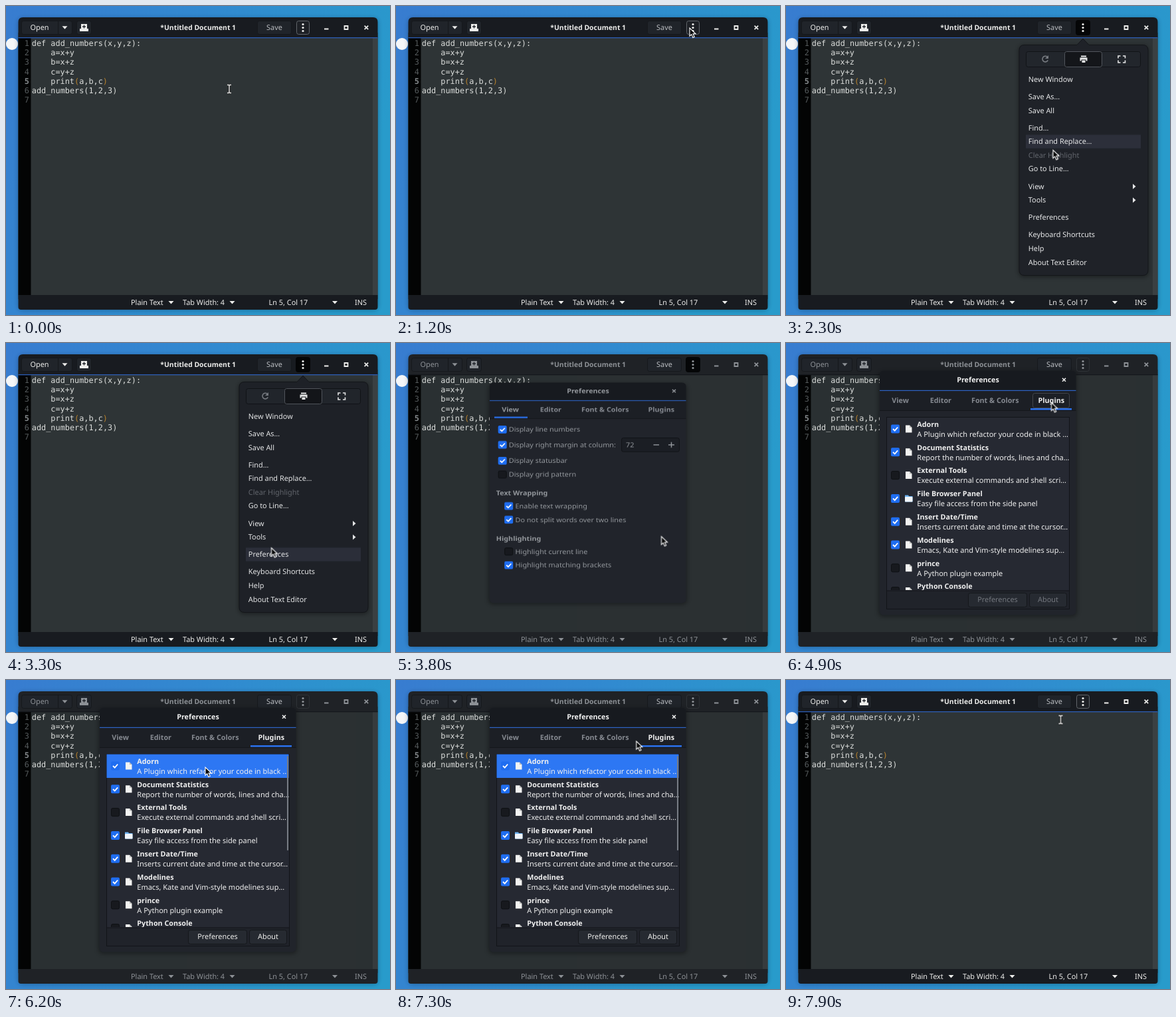
These frames come from a looping animation (578x464 px, 8 s). An HTML page:

```html
<!DOCTYPE html>
<html lang="en">
<head>
<meta charset="utf-8">
<title>Text editor preferences</title>
<style>
html, body { margin: 0; width: 100%; height: 100%; overflow: hidden; background: #2f86d0; }
svg { display: block; width: 578px; height: 464px; }
text { font: 10.9px "Noto Sans", "Open Sans", sans-serif; fill: currentColor; text-rendering: geometricPrecision; white-space: pre; }
.b { font-weight: 700; font-size: 10.75px; }
.title { font-weight: 700; font-size: 10.4px; }
.note { font-size: 11px; }
.mid { text-anchor: middle; }
.code { font: 11.86px "DejaVu Sans Mono", "Noto Sans Mono", monospace; fill: #dcdedc; }
.num { fill: #555a5c; text-anchor: end; }
.now { fill: #858a8c; font-weight: 700; }
.soft { fill: #b9bcc0; }
.off { fill: #62666d; }
.tab { fill: #858990; }
.bracket { fill: #b9812c; }

.chrome, .bar, .accent, .ring, .pressed, .menu, .hover, .view, .plugins, .tabhover,
.picked, .acts, .pointer, .arrow, .beam, .shade { animation: 8s infinite step-end; }

.chrome { animation-name: chrome; }
@keyframes chrome { 0%, 96.2% { color: #eeeeec } 45.4% { color: #8d9196 } }
.bar { animation-name: bar; }
@keyframes bar { 0%, 96.2% { fill: #181b20 } 45.4% { fill: #1f2226 } }
.accent { animation-name: accent; }
@keyframes accent { 0%, 96.2% { fill: #2c5cb4 } 45.4% { fill: #15181d } }
.ring { animation-name: ring; }
@keyframes ring { 0%, 96.2% { opacity: 1 } 45.4% { opacity: .25 } }
.shade { animation-name: shade; }
@keyframes shade { 0%, 96.2% { opacity: 0 } 45.4% { opacity: .07 } }
.pressed { animation-name: pressed; }
@keyframes pressed { 0%, 48.5% { opacity: 0 } 17.5% { opacity: 1 } }

.menu { color: #e6e7e8; animation-name: menu; animation-timing-function: linear; }
@keyframes menu { 0%, 17.5%, 42.5%, 100% { opacity: 0 } 18.75%, 41.25% { opacity: 1 } }
.hover { animation-name: hover; }
@keyframes hover {
  0% { transform: translateY(110px); opacity: 0 }
  25.16% { transform: translateY(110px); opacity: 1 }
  25.96% { transform: translateY(136px); opacity: 1 }
  26.6% { transform: translateY(157px); opacity: 1 }
  27.4% { transform: translateY(183px); opacity: 1 }
  28.04% { transform: translateY(203.5px); opacity: 1 }
  29.4% { transform: translateY(244.5px); opacity: 1 }
  30.4% { transform: translateY(271px); opacity: 1 }
  31.2% { transform: translateY(291.5px); opacity: 1 }
  32.2%, 100% { transform: translateY(317.5px); opacity: 1 }
}

.dialog { transform-origin: 0 225px; animation: dialog 8s infinite linear, focus 8s infinite step-end; }
@keyframes dialog {
  0%, 45.37%, 97%, 100% { transform: scaleY(0) }
  46.25% { transform: scaleY(.52) }
  47.5% { transform: scaleY(.9) }
  48.5%, 95.4% { transform: scaleY(1) }
}
@keyframes focus { 0%, 95.4% { color: #94989d } 48.4% { color: #f0f0f0 } }
.view { animation-name: view; }
@keyframes view { 0% { opacity: 1 } 59.4% { opacity: 0 } }
.plugins { animation-name: plugins; }
@keyframes plugins { 0% { opacity: 0 } 59.4% { opacity: 1 } }
.tabhover { animation-name: tabhover; }
@keyframes tabhover { 0%, 63.2% { opacity: 0 } 56.7% { opacity: 1 } }
.picked { animation-name: picked; }
@keyframes picked { 0% { opacity: 0 } 73.75% { opacity: 1 } }
.acts { animation-name: acts; }
@keyframes acts { 0% { color: #73777e } 73.75% { color: #eeeeec } }

.pointer { animation-name: pointer; animation-timing-function: linear; }
@keyframes pointer {
  0%, 7.5% { transform: translate(336px, 124.5px) }
  11.25% { transform: translate(450px, 128px) }
  12.5% { transform: translate(443px, 36px) }
  15% { transform: translate(442px, 33px) }
  23.125% { transform: translate(441px, 34px) }
  28.75% { transform: translate(402px, 216px) }
  32.5%, 39.4% { transform: translate(399.5px, 316px) }
  45%, 49.4% { transform: translate(399.5px, 290.5px) }
  56.9%, 62.5% { transform: translate(399.5px, 89.5px) }
  71.25%, 80% { transform: translate(300px, 131px) }
  88.75%, 91.25% { transform: translate(361.5px, 92px) }
  94%, 95.6% { transform: translate(416px, 54px) }
  98.1%, 100% { transform: translate(413.5px, 59.5px) }
}
.arrow { animation-name: arrow; }
@keyframes arrow { 0%, 96.3% { opacity: 0 } 11.6% { opacity: 1 } }
.beam { animation-name: beam; }
@keyframes beam { 0%, 96.3% { opacity: 1 } 11.6% { opacity: 0 } }
</style>
</head>
<body>
<svg id="stage" viewBox="0 0 578 464" xmlns="http://www.w3.org/2000/svg"></svg>
<script>
// Labels are placed by the vertical centre of their capitals.
const label = (x, y, s, cls = '') => `<text x="${x}" y="${y + 3.8}" class="${cls}">${s}</text>`;
const box = (x, y, w, h, fill, more = '') => `<rect x="${x}" y="${y}" width="${w}" height="${h}" fill="${fill}" ${more}/>`;
const button = (x, y, w, h, fill = '#20242a', line = '#15181c') =>
  box(x + .5, y + .5, w - 1, h - 1, fill, `rx="3" stroke="${line}"`);
const line = (d, w = 1.5) => `<path d="${d}" fill="none" stroke="currentColor" stroke-width="${w}"/>`;
const shape = d => `<path d="${d}" fill="currentColor"/>`;
const down = (x, y) => shape(`M${x - 4} ${y - 2}h8l-4 4.5z`);
const group = (cls, ...parts) => `<g class="${cls}">${parts.join('')}</g>`;

const check = (x, y, on) => on
  ? box(x, y - 6.5, 13, 13, '#1f6df0', 'rx="2"') +
    `<path d="M${x + 3} ${y}l2.7 2.7 4.5-5.2" fill="none" stroke="#fff" stroke-width="1.8"/>`
  : box(x + .5, y - 6, 12, 12, '#17191e', 'rx="2" stroke="#0e1013"');

const desktop = () =>
  box(0, 0, 578, 464, 'url(#sky)') +
  '<circle cx="9" cy="57" r="9" fill="#f4f6f8"/>' +
  box(18, 18, 542, 439, '#06152c', 'rx="7" opacity=".3" filter="url(#blur)"');

const rows = ['def add_numbers(x,y,z):', 'a=x+y', 'b=x+z', 'c=y+z',
  'print<tspan class="bracket">(</tspan>a,b,c<tspan class="bracket">)</tspan>', 'add_numbers(1,2,3)', ''];
const editor = () => box(18.5, 40, 541, 400, '#2e3436') +
  box(552, 48, 7.5, 386, '#3a4042') +
  group('shade', box(18.5, 48, 541, 386, '#000')) +
  box(18.5, 48, 19, 386, '#030404') +
  rows.map((s, i) => {
    const y = 60 + 14.2 * i, inset = i > 0 && i < 5 ? 28.5 : 0;
    return `<text x="35" y="${y}" class="code num ${i === 4 ? 'now' : ''}">${i + 1}</text>` +
      `<text x="${38.8 + inset}" y="${y}" class="code">${s}</text>`;
  }).join('');

const dots = [27.5, 32.5, 37.5].map(y => `<circle cx="447" cy="${y}" r="1.6" fill="currentColor"/>`).join('');
const header = () => `<path class="bar" d="M18.5 48V24q0-7 7-7h527q7 0 7 7v24z"/>` +
  `<rect x="18.5" y="47" width="541" height="1.3" class="accent"/>` +
  group('chrome',
    button(23, 22, 77, 21), box(78, 23, 1, 19, '#14171b'), label(36.5, 32.3, 'Open'), down(88.5, 32.3),
    button(106, 22, 23, 21),
    shape('M113 27h9v7h2v4h-13v-4h2z'),
    `<path d="M117.5 28.5v5M115 31h5" stroke="#20242a" stroke-width="1.3"/>`,
    label(289.2, 32, '*Untitled Document 1', 'title mid'),
    button(378, 22, 52, 21), label(404, 32.3, 'Save', 'mid soft'),
    group('ring', button(437, 22, 20, 21, '#1d2025', '#62666b')),
    group('pressed', button(436, 21, 22, 23, '#050607', '#050607')), dots,
    line('M479 34.5h6.5', 2), line('M509.5 30h5v5h-5z', 1.8), line('M539.6 29.6l5.6 5.6m0-5.6l-5.6 5.6', 1.7));

const status = () => `<path class="bar" d="M18.5 434h541v18q0 4-4 4h-533q-4 0-4-4z"/>` +
  group('chrome', label(188, 445, 'Plain Text'), down(248.5, 445), label(266, 445, 'Tab Width: 4'), down(340.5, 445),
    label(395.5, 445, 'Ln 5, Col 17'), down(495, 445), label(525, 445.5, 'INS'));

const items = [['New Window', 110], ['Save As…', 136], ['Save All', 157], ['Find…', 183],
  ['Find and Replace…', 203.5], ['Clear Highlight', 224, 'off'], ['Go to Line…', 244.5], ['View', 271],
  ['Tools', 291.5], ['Preferences', 317.5], ['Keyboard Shortcuts', 343.5], ['Help', 364], ['About Text Editor', 385]];
const menu = () => group('menu',
  box(350, 59, 196, 348, '#000', 'rx="8" opacity=".4" filter="url(#blur)"'),
  `<path d="M359 58.5h79l9-9.5 9 9.5h81q8 0 8 8v330q0 8-8 8h-178q-8 0-8-8v-330q0-8 8-8z" fill="#1f2228" stroke="#14161a"/>`,
  button(361, 68, 173, 24, '#22262c', '#111317'), button(419, 68, 57, 24, '#14161a', '#51555c'),
  `<g color="#777b81">${line('M393.3 76.5a4.3 4.3 0 1 0 .9 4.8', 1.6)}${shape('M395 74v5h-5z')}</g>`,
  shape('M444 74.5h8v2h-8zM442.5 77.5h11v5h-2v-2h-7v2h-2zM445.5 81.5h5v3.5h-5z'),
  line('M500 78.5v-3.5h3.5M507 75h3.5v3.5M510.5 81.5v3.5h-3.5M503.5 85h-3.5v-3.5', 1.6),
  `<g class="hover">${box(361, -10.3, 173, 20.6, '#2c2f3a')}</g>`,
  ...items.map(([s, y, cls]) => label(364.8, y, s, cls)),
  shape('M522 267l4.5 4-4.5 4z'), shape('M522 287.5l4.5 4-4.5 4z'));

const options = [['Display line numbers', 119.5, 0, 1], ['Display right margin at column:', 145, 0, 1],
  ['Display statusbar', 171.5, 0, 1], ['Display grid pattern', 194.5, 0, 0], ['Enable text wrapping', 247, 1, 1],
  ['Do not split words over two lines', 269.7, 1, 1], ['Highlight current line', 322.7, 1, 0],
  ['Highlight matching brackets', 345.5, 1, 1]];
const viewPage = () => group('view',
  box(148, 98, 50, 2.6, '#2a6fe8'), label(159.3, 86, 'View', 'b'), label(379.5, 86, 'Plugins', 'b tab'),
  ...options.map(([s, y, deep, on]) => check(153.7 + 9.5 * deep, y, on) + label(169.7 + 9.8 * deep, y, s)),
  label(150.8, 225.5, 'Text Wrapping', 'b'), label(150.8, 301, 'Highlighting', 'b'),
  button(339, 133, 88, 24, '#1b1e24', '#111317'), label(346, 145, '72'),
  line('M387.5 145h8.5M410 145h9M414.5 140.5v9'));

const plugins = [['Adorn', 'A Plugin which refactor your code in black …', 1],
  ['Document Statistics', 'Report the number of words, lines and cha…', 1],
  ['External Tools', 'Execute external commands and shell scri…', 0],
  ['File Browser Panel', 'Easy file access from the side panel', 1],
  ['Insert Date/Time', 'Inserts current date and time at the cursor…', 1],
  ['Modelines', 'Emacs, Kate and Vim-style modelines sup…', 1],
  ['prince', 'A Python plugin example', 0], ['Python Console', '', 0]];
const icon = (y, folder) => folder
  ? `<path d="M179 ${y - 5}h5l1 1.5h5.5v8.5h-11.5z" fill="#6db3f2"/>` + box(179, y - 2.5, 11.5, 7.5, '#f2f6fa', 'rx="1"')
  : `<path d="M180 ${y - 5.5}h6l3.5 3.500v7.500h-9.500z" fill="#f3f3f2"/><path d="M186 ${y - 5.5}v3.500h3.500z" fill="#b9b9b8"/>`;
const pluginPage = () => group('plugins',
  box(368, 98, 62, 2.6, '#2a6fe8'), label(159.3, 86, 'View', 'b tab'), label(379.5, 86, 'Plugins', 'b'),
  box(151.5, 111.5, 275, 288, '#20232a', 'stroke="#121419"'), box(152, 112, 274, 260, '#262932'),
  group('picked', box(151.5, 111.5, 274, 35.5, '#2d77f3')),
  '<g clip-path="url(#list)">',
  ...plugins.map(([name, note, on], i) => {
    const y = 122 + 34.8 * i;
    return check(158, y + 7, on) + icon(y + 7, i === 3) + label(197.3, y, name, 'b') + label(197.3, y + 15, note, 'note');
  }),
  '</g>',
  group('picked', box(423, 114, 2, 142, '#767b83', 'rx="1"')),
  box(152, 371.5, 274, 1, '#121419'),
  group('acts', button(274, 375, 89, 22, '#262a31', '#14171b'), label(318.5, 385.5, 'Preferences', 'mid'),
    button(366, 375, 57, 22, '#262a31', '#14171b'), label(394.5, 385.5, 'About', 'mid')));

const dialog = () => group('dialog',
  box(139, 43, 299, 368, '#000', 'rx="7" opacity=".35" filter="url(#blur)"'),
  box(141, 41.5, 295.5, 367, '#21242b', 'rx="6"'),
  '<path d="M141 71V48q0-6.5 6.5-6.5h282.5q6.5 0 6.5 6.5V71z" fill="#171a1f"/>',
  box(141, 70.8, 295.5, 1.3, '#2e63c4'), box(141, 72.1, 295.5, 28.9, '#1c1f25'),
  box(141, 101, 295.5, 1, '#14161b'),
  label(289, 55.3, 'Preferences', 'b mid'), line('M416 52.7l5 5m0-5l-5 5', 1.6),
  label(216.7, 86, 'Editor', 'b tab'), label(279, 86, 'Font &amp; Colors', 'b tab'),
  group('tabhover', button(371, 75, 56, 23, '#1c1f25', '#43464d')),
  viewPage(), pluginPage());

const pointer = () => group('pointer',
  group('arrow', '<path d="M0 0v12.2l2.8-2.6 2.1 4.9 2.3-1-2.1-4.7h3.9z" fill="#08090a" stroke="#fff" stroke-width="1.1"/>'),
  group('beam', ...[['#111', 3], ['#fff', 1.3]].map(([c, w]) =>
    `<path d="M-3-6h2l1 1 1-1h2M0-5v10M-3 6h2l1-1 1 1h2" fill="none" stroke="${c}" stroke-width="${w}"/>`)));

const defs = `<defs>
  <linearGradient id="sky" x2="1" y2=".35"><stop stop-color="#387cd0"/><stop offset=".5" stop-color="#318ad0"/><stop offset="1" stop-color="#289bcb"/></linearGradient>
  <filter id="blur" x="-10%" y="-10%" width="120%" height="120%"><feGaussianBlur stdDeviation="3"/></filter>
  <clipPath id="list"><rect x="152" y="112" width="274" height="259"/></clipPath>
</defs>`;

document.getElementById('stage').innerHTML = defs + desktop() + editor() + header() + status() +
  menu() + dialog() + pointer();
</script>
</body>
</html>
```
